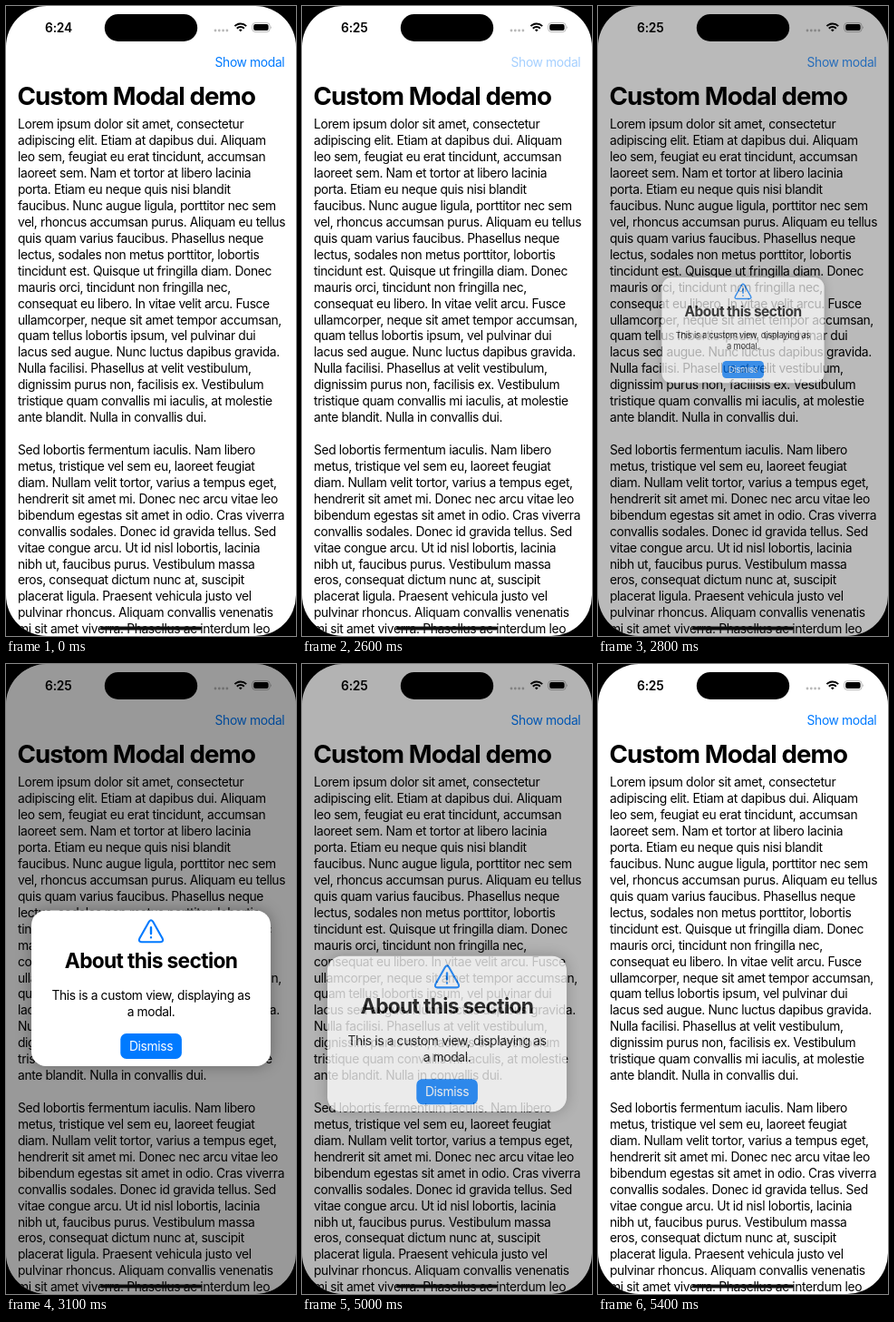
Animation of 320 by 694 pixels, one loop 7.14 s. Source, as an HTML page:

```html
<!DOCTYPE html>
<html lang="en">
<head>
<meta charset="utf-8">
<title>Custom modal</title>
<style>
  html, body { margin: 0; width: 100%; height: 100%; overflow: hidden; background: #000; }
  svg { display: block; width: 320px; height: 694px; }
  text { font: 13.84px Inter, "Liberation Sans", sans-serif; letter-spacing: -.36px; font-optical-sizing: none; white-space: pre; }
  .title { font-size: 27.7px; font-weight: 700; letter-spacing: -.034em; }
  .heading { font-size: 22.8px; font-weight: 700; letter-spacing: -.03em; }
  .clock { font-weight: 600; letter-spacing: -.2px; }
  .mid { text-anchor: middle; }
  .box { filter: drop-shadow(0 0 8px rgba(0, 0, 0, .33)); }
</style>
</head>
<body>
<svg viewBox="0 0 320 694">
  <defs><clipPath id="screen"><rect width="320" height="694" rx="45"/></clipPath></defs>
  <g clip-path="url(#screen)">
    <rect width="320" height="694" fill="#fff"/>
    <text id="clock" class="clock" x="43" y="28.5">6:24</text>
    <g fill="#b8b8b8">
      <circle cx="231" cy="27" r="1.4"/><circle cx="235.3" cy="27" r="1.4"/>
      <circle cx="239.6" cy="27" r="1.4"/><circle cx="243.9" cy="27" r="1.4"/>
    </g>
    <g fill="none" stroke="#000" stroke-width="2">
      <path d="M252.4 22.1a9.2 9.2 0 0 1 12.8 0M254.8 24.7a5.8 5.8 0 0 1 8 0"/>
      <path d="M258.8 28.3l-1.8-1.9a2.6 2.6 0 0 1 3.6 0z" fill="#000" stroke="none"/>
    </g>
    <rect x="271.7" y="18.6" width="19.4" height="9.9" rx="3.2" fill="none" stroke="#a6a6a6" stroke-width=".8"/>
    <rect x="273.2" y="20.1" width="16.4" height="6.9" rx="2"/>
    <path d="M292.2 21.9q1.6 1.6 0 3.3z" fill="#a6a6a6"/>
    <text id="show" x="230.6" y="67" fill="#007aff">Show modal</text>
    <text class="title" x="12.5" y="109">Custom Modal demo</text>
    <g id="body"></g>
    <rect x="104" y="683.4" width="112" height="4" rx="2" fill="#111"/>
    <rect id="dim" width="320" height="694" opacity="0"/>
    <g id="modal" opacity="0">
      <g class="box"><rect x="28" y="271.5" width="264" height="171.5" rx="16" fill="#fff"/></g>
      <g fill="none" stroke="#007aff" stroke-width="2.1" stroke-linecap="round" stroke-linejoin="round">
        <path d="M158 283.6L147.4 302.2Q145.7 306 149.6 306.2H170.4Q174.3 306 172.6 302.2L162 283.6Q160 280.8 158 283.6z"/>
        <path d="M160 290.2v6.8M160 301.2v.1" stroke-width="2.4"/>
      </g>
      <text class="heading mid" x="160" y="335">About this section</text>
      <text class="mid" x="160" y="370">This is a custom view, displaying as</text>
      <text class="mid" x="160" y="388">a modal.</text>
      <g id="dismiss">
        <rect x="126.3" y="407" width="67.6" height="28" rx="6.5" fill="#007aff"/>
        <text id="label" class="mid" x="160" y="426" fill="#fff">Dismiss</text>
      </g>
    </g>
    <rect x="108.8" y="9" width="102.4" height="30" rx="15"/>
  </g>
</svg>
<script>
const LINES = `Lorem ipsum dolor sit amet, consectetur
adipiscing elit. Etiam at dapibus dui. Aliquam
leo sem, feugiat eu erat tincidunt, accumsan
laoreet sem. Nam et tortor at libero lacinia
porta. Etiam eu neque quis nisi blandit
faucibus. Nunc augue ligula, porttitor nec sem
vel, rhoncus accumsan purus. Aliquam eu tellus
quis quam varius faucibus. Phasellus neque
lectus, sodales non metus porttitor, lobortis
tincidunt est. Quisque ut fringilla diam. Donec
mauris orci, tincidunt non fringilla nec,
consequat eu libero. In vitae velit arcu. Fusce
ullamcorper, neque sit amet tempor accumsan,
quam tellus lobortis ipsum, vel pulvinar dui
lacus sed augue. Nunc luctus dapibus gravida.
Nulla facilisi. Phasellus at velit vestibulum,
dignissim purus non, facilisis ex. Vestibulum
tristique quam convallis mi iaculis, at molestie
ante blandit. Nulla in convallis dui.

Sed lobortis fermentum iaculis. Nam libero
metus, tristique vel sem eu, laoreet feugiat
diam. Nullam velit tortor, varius a tempus eget,
hendrerit sit amet mi. Donec nec arcu vitae leo
bibendum egestas sit amet in odio. Cras viverra
convallis sodales. Donec id gravida tellus. Sed
vitae congue arcu. Ut id nisl lobortis, lacinia
nibh ut, faucibus purus. Vestibulum massa
eros, consequat dictum nunc at, suscipit
placerat ligula. Praesent vehicula justo vel
pulvinar rhoncus. Aliquam convallis venenatis
mi sit amet viverra. Phasellus ac interdum leo`.split('\n');

const LOOP = 7140, STEP = 100, OPEN = 2595, CLOSE = 4915, TRAVEL = 198;
const $ = id => document.getElementById(id);
const set = (id, name, value) => $(id).setAttribute(name, value);

$('body').innerHTML = LINES.map((line, i) =>
  `<text x="13" y="${(135.4 + i * 17.93).toFixed(2)}">${line}</text>`).join('');

// Critically damped spring, settled once it is visually at rest.
function spring(ms) {
  if (ms <= 0) return 0;
  if (ms > 480) return 1;
  const x = ms / 550 * 2 * Math.PI;
  return 1 - (1 + x) * Math.exp(-x);
}

function draw() {
  const t = Math.floor(performance.now() % LOOP / STEP) * STEP;
  const shown = spring(t - OPEN), gone = spring(t - CLOSE);
  const alpha = shown * (1 - gone);
  const pressed = t === 4900 ? .75 : 1;

  $('clock').textContent = t < 2000 ? '6:24' : '6:25';
  set('show', 'opacity', t < 2100 ? 1 : .35 + .65 * shown);
  set('dim', 'opacity', .4 * alpha);
  set('modal', 'opacity', alpha);
  set('modal', 'transform',
    `translate(160 ${357 + TRAVEL * gone}) scale(${shown}) translate(-160 -357)`);
  set('dismiss', 'opacity', pressed);
  set('label', 'opacity', pressed);
  requestAnimationFrame(draw);
}
draw();
</script>
</body>
</html>
```
